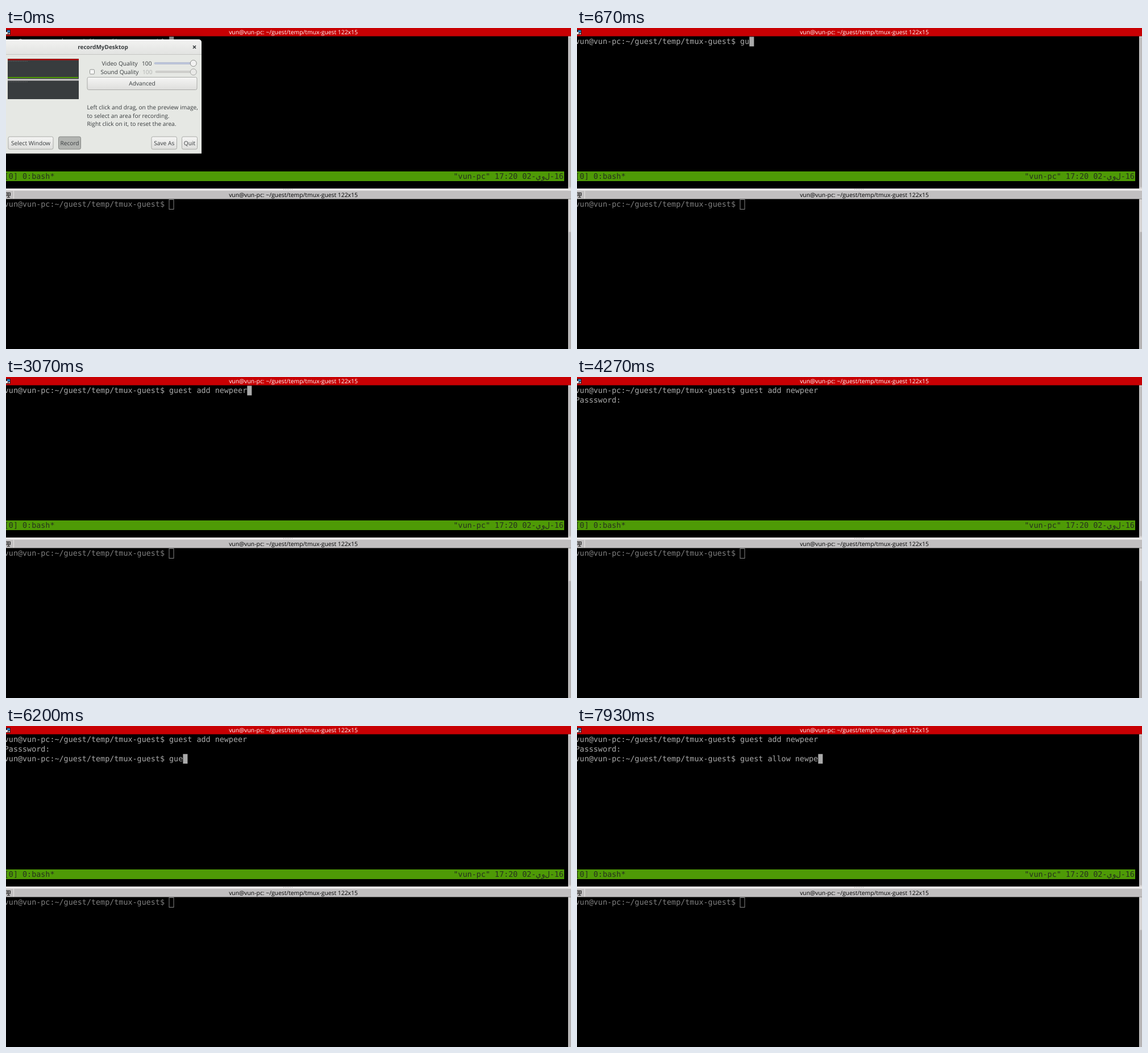
Recreate the animation shown at these times as an HTML page. Size 994x564 px, loop 8 s.

```html
<!DOCTYPE html>
<html lang="en">
<head>
<meta charset="utf-8">
<title>Shared terminal</title>
<style>
  html, body { margin: 0; width: 100%; height: 100%; overflow: hidden; background: #000; }
  svg { display: block; width: 100vw; height: 100vh; }
  text { white-space: pre; text-rendering: geometricPrecision; }
  .mono { font: 13.4px "DejaVu Sans Mono", monospace; fill: #aaa; }
  .ui { font: 10.2px "Open Sans", "Noto Sans", sans-serif; fill: #383c3e; }
  .title { font-size: 10.35px; text-anchor: middle; }
  .status text { fill: #262f1e; }
  .mid { text-anchor: middle; }
  .button { fill: url(#face); stroke: #a9aaa7; }
  .off { fill: #b0b2af; }
</style>
</head>
<body>
<svg viewBox="0 0 994 564">
  <defs>
    <linearGradient id="face" x2="0" y2="1">
      <stop stop-color="#f5f5f4"/><stop offset="1" stop-color="#dededc"/>
    </linearGradient>
    <linearGradient id="header" x2="0" y2="1">
      <stop stop-color="#f3f3f2"/><stop offset="1" stop-color="#e2e3e1"/>
    </linearGradient>
    <filter id="shadow" x="-20%" y="-20%" width="150%" height="150%">
      <feDropShadow dx="0" dy="2" stdDeviation="7" flood-opacity=".75"/>
    </filter>
  </defs>

  <rect width="994" height="564"/>
  <g id="terminal"></g>
  <rect id="cursor" width="8.07" height="16.9" fill="#aaa"/>
  <rect x="287" y="301.5" width="8" height="17" fill="none" stroke="#858585"/>

  <g class="status">
    <rect y="252" width="982" height="17" fill="#4e9a06"/>
    <g id="status"></g>
  </g>

  <!-- Pane frames -->
  <rect width="994" height="14.5" fill="#c80003"/>
  <rect x="0" y="3" width="8" height="9" fill="#3b1114"/>
  <path d="M2 4h5v4h-5z" fill="#2c7fc0"/>
  <path d="M0 7h3v4h-3z" fill="#e8e8e8"/>
  <path d="M4 9h3v2h-3z" fill="#c9b7b7"/>
  <rect x="989" y="14.5" width="5" height="268" fill="#d4d2d2"/>
  <rect x="990" y="16" width="4" height="264" rx="2" fill="#bdbbbc"/>
  <rect y="282" width="994" height="4" fill="#e7e5e5"/>
  <path d="M488 283.5h18" stroke="#a5a3a3" stroke-dasharray="1 2"/>
  <rect y="286" width="994" height="14.5" fill="#c1bfc0"/>
  <path d="M13.5 286v14" stroke="#e4e2e2"/>
  <path d="M-1 289.5h8.5v5h-8.5M3.5 289v5M0 292h7M2 297.5h5M4.500 295v3" fill="none" stroke="#222"/>
  <rect x="989" y="300.500" width="5" height="264" fill="#d4d2d2"/>
  <rect x="990" y="358" width="4" height="210" rx="2" fill="#b4b2b3"/>
  <text id="topTitle" class="ui title" x="505.5" y="11.2" style="fill:#fff"></text>
  <text id="bottomTitle" class="ui title" x="505.5" y="297.2" style="fill:#000"></text>

  <g id="dialog" class="ui">
    <path d="M-8 20H338Q344 20 344 26V220.500H-8Z" fill="#e6e8e4" filter="url(#shadow)"/>
    <path d="M-8 20H338Q344 20 344 26V46.500H-8Z" fill="url(#header)"/>
    <path d="M0 46.500H344" stroke="#c6c7c4"/>
    <text class="mid" x="170.500" y="37" font-weight="700" style="font-size:10px">recordMyDesktop</text>
    <path d="M329 31l5 5m0-5l-5 5" stroke="#33373a" stroke-width="1.600"/>

    <rect x="3" y="54" width="125" height="71"/>
    <path d="M3 55.500H128" stroke="#c80003" stroke-width="2"/>
    <path d="M3 58.500H38M3 94.500H38" stroke="#666" stroke-width=".7" stroke-dasharray="2 1"/>
    <path d="M3 87H127" stroke="#4e9a06" stroke-width="2"/>
    <path d="M3 91H128" stroke="#c9c7c8" stroke-width="3"/>

    <text x="168.500" y="65.500">Video Quality</text>
    <text x="239" y="65.500">100</text>
    <text x="166.500" y="81">Sound Quality</text>
    <text class="off" x="240" y="81">100</text>
    <rect x="147.500" y="73" width="8" height="8" rx="1.500" fill="#f6f6f5" stroke="#8f918e"/>
    <rect x="261" y="60.500" width="69" height="3" rx="1.500" fill="#bcc5dc" stroke="#a8b0c4" stroke-width=".6"/>
    <rect x="263" y="75.500" width="67" height="3" rx="1.500" fill="#cfd0cd" stroke="#bfc0bd" stroke-width=".6"/>
    <circle cx="329.700" cy="62" r="5.500" fill="#f2f2f1" stroke="#8f918e"/>
    <circle cx="329.700" cy="77.300" r="5.500" fill="#e9e9e7" stroke="#a2a4a1"/>

    <text x="142.500" y="143">Left click and drag, on the preview image,</text>
    <text x="142.500" y="157.500">to select an area for recording.</text>
    <text x="142.500" y="172">Right click on it, to reset the area.</text>
    <g id="buttons"></g>
  </g>
</svg>

<script>
const LOOP = 8000;
const COL = 8.066, ROW = 16.93, LEFT = -3.2, TOP = 15.4;
const PLACE = '~/guest/temp/tmux-guest';
const PROMPT = `vun@vun-pc:${PLACE}$ `;
const byId = id => document.getElementById(id);

function add(parent, tag, attributes, content = '') {
  const node = document.createElementNS('http://www.w3.org/2000/svg', tag);
  for (const name in attributes) node.setAttribute(name, attributes[name]);
  node.textContent = content;
  byId(parent).append(node);
  return node;
}

function addCells(parent, column, row, content, top = TOP) {
  return add(parent, 'text', {
    class: 'mono', x: LEFT + column * COL, y: top + row * ROW + 12.9
  }, content);
}

for (const id of ['topTitle', 'bottomTitle'])
  byId(id).textContent = `vun@vun-pc: ${PLACE} 122x15`;

const lines = [0, 1, 2].map(row => addCells('terminal', 0, row, ''));
addCells('terminal', 0, 0, PROMPT, 301.4).style.fill = '#7f7f7f';

// Each Arabic letter keeps its own terminal cell, in left-to-right order.
addCells('status', 0, 14, '[0] 0:bash*');
addCells('status', 98, 14, '"vun-pc" 17:20 02-');
[...'يول'].forEach((letter, i) => addCells('status', 116 + i, 14, letter));
addCells('status', 119, 14, '-16');

for (const [label, x, y, width, pressed] of [
  ['Advanced', 143, 86.5, 193], ['Select Window', 4, 191, 79],
  ['Record', 92.5, 191, 39, true], ['Save As', 256, 191, 44.5], ['Quit', 309.5, 191, 27]
]) {
  const face = add('buttons', 'rect', { class: 'button', x, y, width, height: 22, rx: 2.5 });
  if (pressed) face.style.cssText = 'fill:#b2b4b1;stroke:#858784';
  add('buttons', 'text', { class: 'mid', x: x + width / 2, y: y + 14.7 }, label);
}

const addCommand = {
  text: 'guest add newpeer',
  keys: [530, 670, 800, 870, 1000, 1070, 1130, 1800, 1930, 2130,
         2270, 2470, 2600, 2670, 2800, 2930, 3070]
};
const allowCommand = {
  text: 'guest allow newpe',
  keys: [5800, 6000, 6200, 6330, 6400, 6530, 6670, 6870, 7000, 7130,
         7270, 7400, 7530, 7670, 7730, 7870, 7930]
};
const typed = ({ text, keys }, t) => text.slice(0, keys.filter(key => key <= t).length);

function cursorAt(t, first, second) {
  if (t < 3330) return { row: 0, column: first.length, on: t < 1670 || t >= 1800 };
  if (t < 4530) return { row: 1, column: 11, on: t < 3670 };
  if (t < 4870) return { row: 2, column: 0, on: true };
  return { row: 2, column: second.length, on: t >= 5600 };
}

function draw() {
  const t = performance.now() % LOOP;
  const first = PROMPT + typed(addCommand, t);
  const second = PROMPT + typed(allowCommand, t);
  lines[0].textContent = first;
  lines[1].textContent = t < 3330 ? '' : 'Passsword: ';
  lines[2].textContent = t < 4870 ? '' : second;

  const { row, column, on } = cursorAt(t, first, second);
  const cursor = byId('cursor');
  cursor.setAttribute('x', LEFT + column * COL);
  cursor.setAttribute('y', TOP + row * ROW);
  cursor.style.visibility = on ? 'visible' : 'hidden';

  const fadeStep = t < 70 ? 0 : Math.floor((t - 70) / 65) + 1;
  byId('dialog').style.opacity = Math.max(0, 1 - fadeStep / 4);
  requestAnimationFrame(draw);
}
draw();
</script>
</body>
</html>
```
